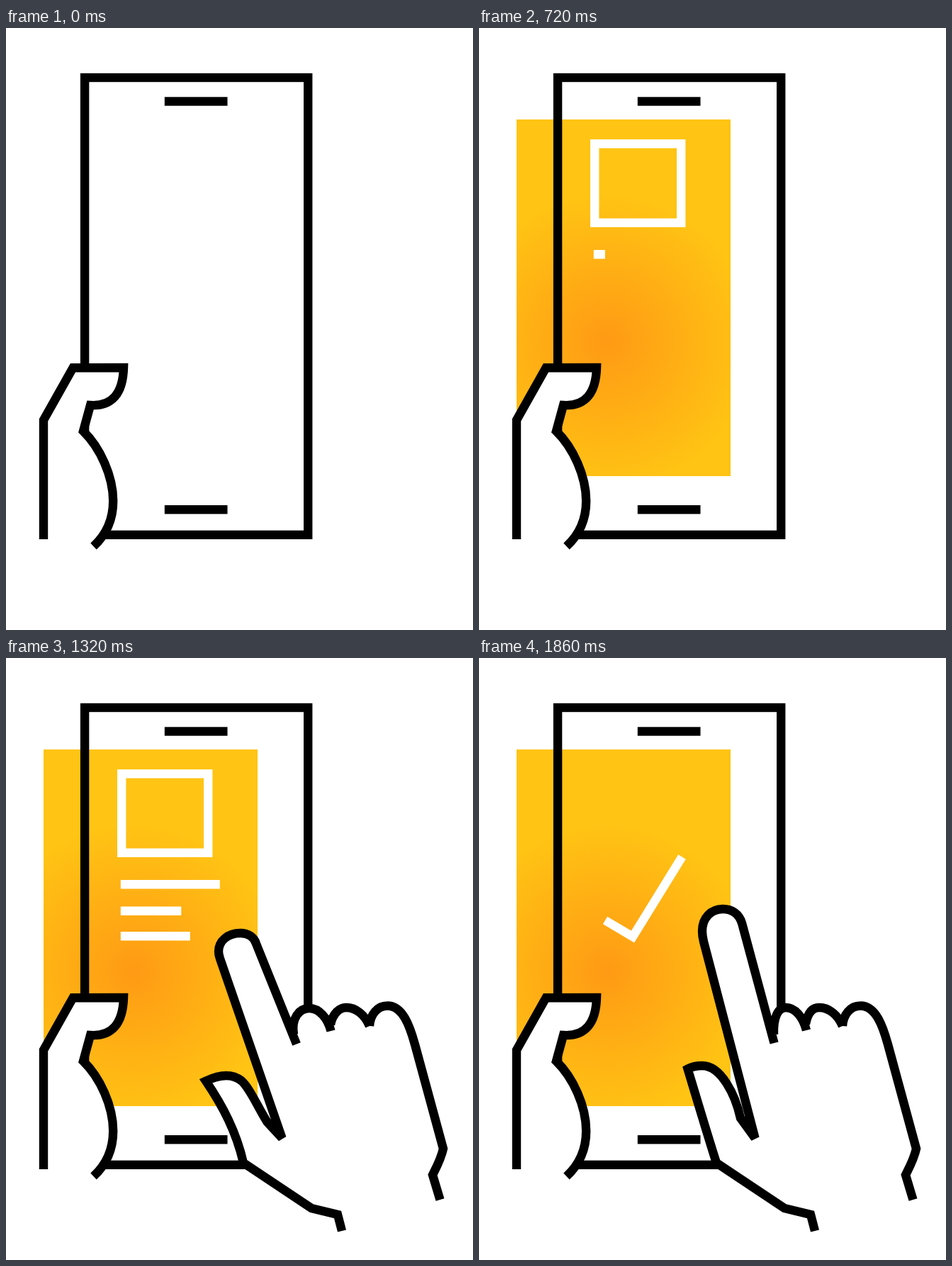
Recreate the animation shown at these times as an HTML page with a canvas. Size 659 px wide and 849 px high, loop 2130 ms.

```html
<!DOCTYPE html>
<html lang="en">
<head>
<meta charset="utf-8">
<title>Phone tap</title>
<style>
html, body { margin: 0; width: 100%; height: 100%; overflow: hidden; background: #fff; }
canvas { display: block; }
</style>
</head>
<body>
<canvas id="stage" width="659" height="849"></canvas>
<script>
const ctx = document.getElementById('stage').getContext('2d');
const LOOP = 2130, STEP = 30, LINE = 12.4;

const leftHand = 'M53 721 L53 553 L94.5 479.3 L166 479 ' +
  'C165 515 150 534 119 532 L109 568.5 ' +
  'C133 592 151.2 632 151.2 667 C151.2 694 142 714 123.5 731';

// The right hand in two poses with the same path commands.
const wristLeft = 'M474 808 L468 785 L431 776 L335 712 ';
const wristRight = 'C560 490 570 520 577 545 L617 692 C614 706 608 717 602 729 L612.5 764';
const straight = wristLeft +
  'C321 668 308 624 294.5 579.5 C301 576 307 575 315 575 C342 575 362 617 369 649 ' +
  'L389.5 677 L317 400 C315.5 394 315 390 315 385 C315 367 327 354 344 354 ' +
  'C357 354 367 361 371 374 L416.5 543 ' +
  'M416 531 C415 507 422 493 433 493 C446 493 457 506 462 525 ' +
  'M461 516 C464 500 471 493 480 493 C494 493 506 503 513 519 ' +
  'M513 519 C514 503 524 490.5 538 490.5 ' + wristRight;
const bent = wristLeft +
  'C325 668 306 632 282 596.5 C300 588 318 585 332 596 C344 606 356 635 369 655 ' +
  'L389.5 677 L302 424 C301 421 300 418 300 414 C300 399 313 388 331 388 ' +
  'C341 388 350 393 353 403 L410 544.5 ' +
  'M406 531 C402 508 414 494 428 494 C442 494 454 508 458.5 526 ' +
  'M458 517 C461 501 471 493 480 493 C494 493 506 503 513 519 ' +
  'M513 519 C514 503 524 490.5 538 490.5 ' + wristRight;

const clamp = v => Math.min(1, Math.max(0, v));
const ramp = (t, from, to) => clamp((t - from) / (to - from));
const smooth = (t, from, to) => { const u = ramp(t, from, to); return u * u * (3 - 2 * u); };
const backOut = u => 1 + 1.9 * (u - 1) ** 3 + 0.9 * (u - 1) ** 2;

function mix(a, b, k) {
  const goal = b.match(/[\d.]+/g);
  let i = 0;
  return a.replace(/[\d.]+/g, n => +n + (goal[i++] - n) * k);
}

function drawHand(path) {
  ctx.fillStyle = '#fff';
  ctx.fill(new Path2D(path[0] + path.slice(1).replace(/M/g, 'L')));
  ctx.strokeStyle = '#000';
  ctx.stroke(new Path2D(path));
}

function drawPanel(t) {
  if (t < 150) return;
  const x = 5 + 48 * smooth(t, 150, 405);
  const glow = ctx.createRadialGradient(x + 127, 442, 0, x + 127, 442, 207);
  glow.addColorStop(0, '#ff9a14');
  glow.addColorStop(1, '#ffc414');
  ctx.globalAlpha = ramp(t, 120, 240);
  ctx.fillStyle = glow;
  ctx.fillRect(x, 129, 302, 503);
  ctx.globalAlpha = 1;
}

function drawContent(t) {
  const out = ramp(t, 1380, 1560);
  const size = out > 0 ? backOut(1 - out) : backOut(ramp(t, 480, 720));
  if (size > 0) {
    ctx.save();
    ctx.translate(224.2, 219);
    ctx.scale(size, size);
    ctx.strokeStyle = '#fff';
    ctx.strokeRect(-61, -55.7, 122, 111.4);
    ctx.restore();
  }
  ctx.fillStyle = '#fff';
  [[313, 140], [350.5, 85.5], [386, 98]].forEach(([y, w], i) => {
    const start = 682 + 180 * i;
    const grow = smooth(t, start, start + 180) * (1 - smooth(t, 1380, 1560));
    if (grow > 0) ctx.fillRect(161.8, y, w * grow, 12.5);
  });
}

function drawCheck(t) {
  const k = smooth(t, 1650, 1860);
  if (k <= 0) return;
  const total = 178;
  ctx.strokeStyle = '#fff';
  ctx.setLineDash([total * k, total * 2]);
  ctx.stroke(new Path2D('M178 370 L217 393 L286.5 280.5'));
  ctx.setLineDash([]);
}

function drawPhone() {
  ctx.strokeStyle = ctx.fillStyle = '#000';
  ctx.strokeRect(111.1, 70, 315.1, 644.8);
  ctx.fillRect(223.8, 97.3, 88.7, 12.4);
  ctx.fillRect(223.8, 673, 88.7, 12.4);
}

function drawRipple(t) {
  const k = ramp(t, 1290, 1800);
  if (k <= 0 || k >= 1) return;
  ctx.globalAlpha = 1 - k;
  ctx.fillStyle = '#ff9914';
  ctx.beginPath();
  ctx.arc(316, 407, 219 * k, 0, Math.PI * 2);
  ctx.fill();
  ctx.globalAlpha = 1;
}

function drawRightHand(t) {
  if (t < 810) return;
  const away = 1 - smooth(t, 810, 1200);
  const bend = smooth(t, 1200, 1320) - smooth(t, 1350, 1470);
  ctx.save();
  ctx.translate(270 * away, 520 * away);
  drawHand(mix(straight, bent, bend));
  ctx.restore();
}

function draw(t) {
  ctx.fillStyle = '#fff';
  ctx.fillRect(0, 0, 659, 849);
  ctx.lineWidth = LINE;
  ctx.miterLimit = 4;
  drawPanel(t);
  drawContent(t);
  drawCheck(t);
  drawPhone();
  drawHand(leftHand);
  drawRipple(t);
  drawRightHand(t);
}

function tick() {
  const t = performance.now() % LOOP;
  draw(Math.floor(t / STEP) * STEP);
  requestAnimationFrame(tick);
}
tick();
</script>
</body>
</html>
```
